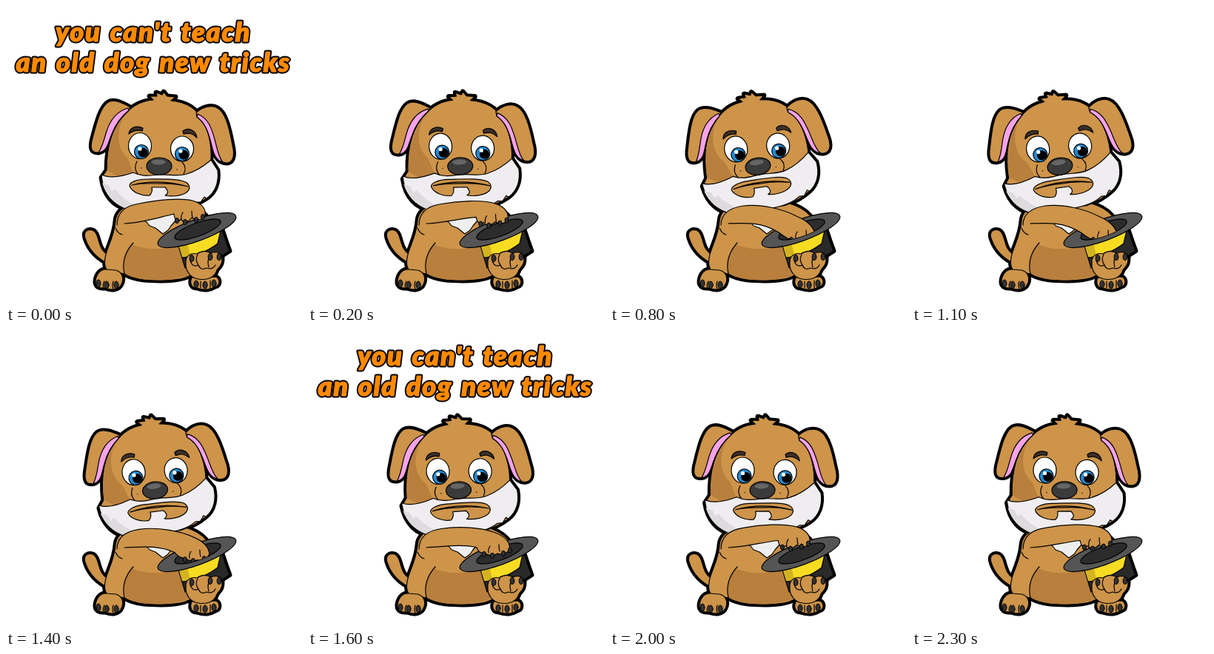
An HTML page that plays this animation: 400x400 px, repeating every 2400 ms.

```html
<!DOCTYPE html>
<html lang="en">
<head>
<meta charset="utf-8">
<title>Old dog, new tricks</title>
<style>
  html, body { margin: 0; width: 100%; height: 100%; overflow: hidden; background: #fff; }
  svg { display: block; width: 100vw; height: 100vh; }
  path, ellipse, circle { stroke-linejoin: round; stroke-linecap: round; }
  .rim { fill: #000; stroke: #000; stroke-width: 6.8; }
  .fur { fill: #cd944a; }
  .line { stroke: #000; stroke-width: 1.2; }
  .open { fill: none; }
  .shade { fill: #b87f3d; }
  .claw { fill: #333; stroke: #000; stroke-width: 1; }
  text { font: italic 900 36px Lato, sans-serif; letter-spacing: 1.7px; word-spacing: 3px;
         text-anchor: middle; stroke-linejoin: round; }
  .back { fill: #000; stroke: #000; stroke-width: 5; }
  .front { fill: #ff8a00; stroke: #ff8a00; stroke-width: 1.2; }
</style>
</head>
<body>
<svg viewBox="0 0 400 400">
  <defs>
    <g id="headShape">
      <path d="M162 145C172 134 184 128 199 127L194 122L204 122L203 117L211 120L213 116L218 122L229 123L223 128C244 130 258 138 266 155C274 170 278 190 277 208L286 222C288 238 283 252 271 260C262 266 250 271 236 274H165C146 272 132 256 129 232L136 222C136 195 142 164 162 145Z"/>
    </g>
    <g id="ears">
      <path d="M168 137C158 131 146 125 138 130C127 137 122 160 116 182C113 196 118 198 125 198C136 197 138 184 143 173C148 160 156 149 166 141Z"/>
      <path d="M257 144C266 136 278 133 286 138C297 144 302 166 306 188C310 204 306 212 298 212C285 212 280 198 277 185C273 168 268 157 258 150Z"/>
    </g>
    <g id="bodyShape">
      <path d="M142 350C128 344 113 333 107 314C104 305 110 301 117 303C125 306 124 320 130 329C135 336 141 338 146 334Z"/>
      <path d="M148 290C147 306 141 318 136 332C132 345 133 353 137 357L160 362C175 371 195 371 210 371C230 371 245 368 252 362L275 350V290C265 272 240 262 210 264C180 264 150 268 148 290Z"/>
      <path d="M136 356C128 355 122 362 121 371C120 379 126 382 134 381C143 385 153 383 156 376C160 368 157 359 148 357Z"/>
      <path d="M251 367C248 374 250 381 258 381C267 385 277 383 283 379C290 377 289 369 284 366Z"/>
    </g>
    <path id="crown" d="M232 320L242 354L272 350L302 331L298 320L291 299Z"/>
    <ellipse id="brim" cx="258" cy="303" rx="56" ry="14.5" transform="rotate(-20 258 303)"/>
    <path id="holdingPaw" d="M243 347C242 338 250 333 258 335C265 330 272 331 277 334C286 330 293 335 292 343C292 351 288 352 285 357C282 367 272 371 260 369C250 368 242 358 243 347Z"/>
    <clipPath id="aboveHat">
      <path d="M0 0H400V290H291A33 9 -20 0 1 228 313L0 330Z"/>
    </clipPath>
  </defs>

  <g class="rim">
    <use href="#bodyShape"/><use href="#crown"/><use href="#holdingPaw"/>
    <g class="head"><use href="#headShape"/><use href="#ears"/></g>
  </g>

  <g class="fur line"><use href="#bodyShape"/></g>
  <path class="shade" d="M160 361C157 345 161 331 170 322C190 331 218 330 240 321L250 362C228 373 180 374 160 361Z"/>
  <path class="open line" d="M148 300C150 305 153 308 157 309M160 362C156 344 162 331 172 320M133 372Q130 377 132 381M145 372Q143 378 145 382M263 372V381M276 371V381"/>
  <g class="claw">
    <ellipse cx="125" cy="375" rx="2.8" ry="5"/><ellipse cx="136" cy="377" rx="3" ry="5"/><ellipse cx="149" cy="377" rx="3" ry="5"/>
    <ellipse cx="257" cy="376" rx="3" ry="5"/><ellipse cx="269" cy="377" rx="3" ry="5"/><ellipse cx="281" cy="375" rx="3" ry="5"/>
  </g>

  <g class="head">
    <g class="fur line"><use href="#headShape"/></g>
    <path class="shade" d="M162 146C144 165 137 195 137 222L155 233L172 226C168 218 167 211 163 204C148 190 149 164 162 146Z"/>
    <path class="line" fill="#efedef" d="M129 228C142 234 158 230 172 225C186 232 198 228 207 228C220 227 232 231 244 227C258 223 269 215 277 208L286 222C288 238 283 252 271 260L268 258L263 265L256 265C248 271 236 274 220 275H177C150 275 131 258 129 228Z"/>
    <path fill="#dddbdd" d="M130 239Q137 263 160 273H180Q157 261 147 247L143 251L139 242Z"/>
    <g class="fur line"><use href="#ears"/></g>
    <g class="line" fill="#f7a3e8">
      <path d="M165 138C150 142 140 155 135 172C132 183 130 191 125 198C137 197 138 184 143 173C148 160 156 149 166 141Z"/>
      <path d="M259 146C274 152 278 166 282 180C285 191 287 205 293 211C283 209 280 198 277 185C273 168 268 157 258 150Z"/>
    </g>
    <path class="open line" d="M177 210Q172 219 178 227M238 211Q245 218 240 227"/>
    <g class="line" fill="#fff">
      <ellipse cx="181" cy="189" rx="15.5" ry="17.5"/><ellipse cx="238" cy="193" rx="15.5" ry="17"/>
    </g>
    <g class="line" fill="#258bd2">
      <circle cx="183" cy="197" r="9.5"/><circle cx="238" cy="200" r="9.5"/>
    </g>
    <circle cx="185" cy="198" r="6.5"/><circle cx="240" cy="201" r="6.5"/>
    <g fill="#fff">
      <circle cx="181" cy="193" r="2.6"/><circle cx="236" cy="196" r="2.6"/>
    </g>
    <path class="line" fill="#3d3027" d="M166 173C167 164 176 161 185 165L184 169C177 167 171 169 166 173ZM239 169C246 163 257 168 258 178C252 172 247 171 240 173Z"/>
    <ellipse class="line" cx="207" cy="216.5" rx="17" ry="11.5" fill="#3b3b3b"/>
    <ellipse cx="206" cy="211" rx="9.5" ry="3.5" fill="#666"/>
    <g><circle cx="183" cy="219" r=".7"/><circle cx="231" cy="221" r=".7"/></g>
    <path class="fur line" d="M167 243C167 238 177 234 190 234C212 234 232 233 243 238C249 242 249 247 245 251C238 257 224 258 215 256C221 253 218 248 215 245H197C198 249 197 253 194 256C184 257 170 252 167 243Z"/>
    <path class="shade line" d="M170 242Q207 233 246 244Q225 239 207 240Q185 239 170 242Z"/>
  </g>

  <path class="line" fill="#eee" d="M178 286L190 292L194 297L202 300L212 308L219 303L223 297L238 280Z"/>
  <g class="line" fill="#292929"><use href="#crown"/></g>
  <path class="line" fill="#f8dc22" d="M232 320L238 340Q265 337 286 321L291 299Z"/>
  <path fill="#d3b31f" d="M233 322L238 339L249 337L245 319Z"/>
  <g class="line" fill="#555"><use href="#brim"/></g>
  <ellipse class="line" cx="259" cy="302" rx="33" ry="9" transform="rotate(-20 259 302)" fill="#2c2c2c"/>

  <g clip-path="url(#aboveHat)">
    <path id="arm" class="fur line"/>
    <g id="claws">
      <path class="open line" d="M239 279Q236 284 237 288M251 277Q251 282 252 286"/>
      <g class="claw">
        <ellipse cx="231" cy="290" rx="2.6" ry="3.6"/><ellipse cx="242" cy="292" rx="2.6" ry="3.6"/>
        <ellipse cx="257" cy="289" rx="2.6" ry="3.6"/><ellipse cx="266" cy="285" rx="2.5" ry="3.6"/>
      </g>
    </g>
  </g>

  <g class="fur line"><use href="#holdingPaw"/></g>
  <path class="open line" d="M249 344Q252 354 260 350Q263 358 271 354Q279 357 283 350M259 336Q255 343 260 350M277 335Q271 343 274 353"/>
  <g class="claw">
    <ellipse cx="251" cy="341" rx="2.8" ry="4.5"/><ellipse cx="276" cy="339" rx="2.8" ry="4.5"/><ellipse cx="288" cy="339" rx="2.8" ry="4.5"/>
  </g>

  <g id="caption">
    <g class="back"><text x="199" y="48">you can't teach</text><text x="199" y="88.5">an old dog new tricks</text></g>
    <g class="front"><text x="199" y="48">you can't teach</text><text x="199" y="88.5">an old dog new tricks</text></g>
  </g>
</svg>
<script>
  const LOOP = 2400, STEP = 100, REST = 0.86;
  const heads = document.querySelectorAll('.head');
  const [arm, claws, caption] = ['arm', 'claws', 'caption'].map(id => document.getElementById(id));

  const raised = 'M150 296C150 280 160 270 180 267C205 262 235 259 252 263C266 267 272 276 268 286C262 291 255 289 251 286C246 293 239 293 237 288C232 293 228 290 227 281C205 286 185 293 160 294';
  const lowered = 'M150 296C150 281 160 273 180 270C205 267 235 275 252 284C266 290 275 298 277 308C272 318 266 318 262 318C252 318 246 316 240 314C236 312 232 309 228 306C205 292 185 293 160 294'.match(/\d+/g);

  const ease = x => {
    x = Math.min(1, Math.max(0, x));
    return x * x * (3 - 2 * x);
  };
  const lift = t => t < 1100 ? 1 - ease(t / 750) : REST * ease((t - 1100) / 900);

  function armPath(up) {
    let i = 0;
    return raised.replace(/\d+/g, n => {
      const low = +lowered[i++];
      return (low + (n - low) * up).toFixed(2);
    });
  }

  function draw(now) {
    const tick = Math.floor(now % LOOP / STEP);
    const up = lift(tick * STEP);
    for (const head of heads) head.setAttribute('transform', `rotate(${-8.5 * (1 - up)} 205 264)`);
    arm.setAttribute('d', armPath(up));
    claws.setAttribute('transform', `translate(${14 * (1 - up)} ${26 * (1 - up)})`);
    caption.setAttribute('visibility', tick % 3 < 2 ? 'visible' : 'hidden');
  }

  const start = performance.now();
  function loop() {
    draw(performance.now() - start);
    requestAnimationFrame(loop);
  }
  loop();
</script>
</body>
</html>
```
